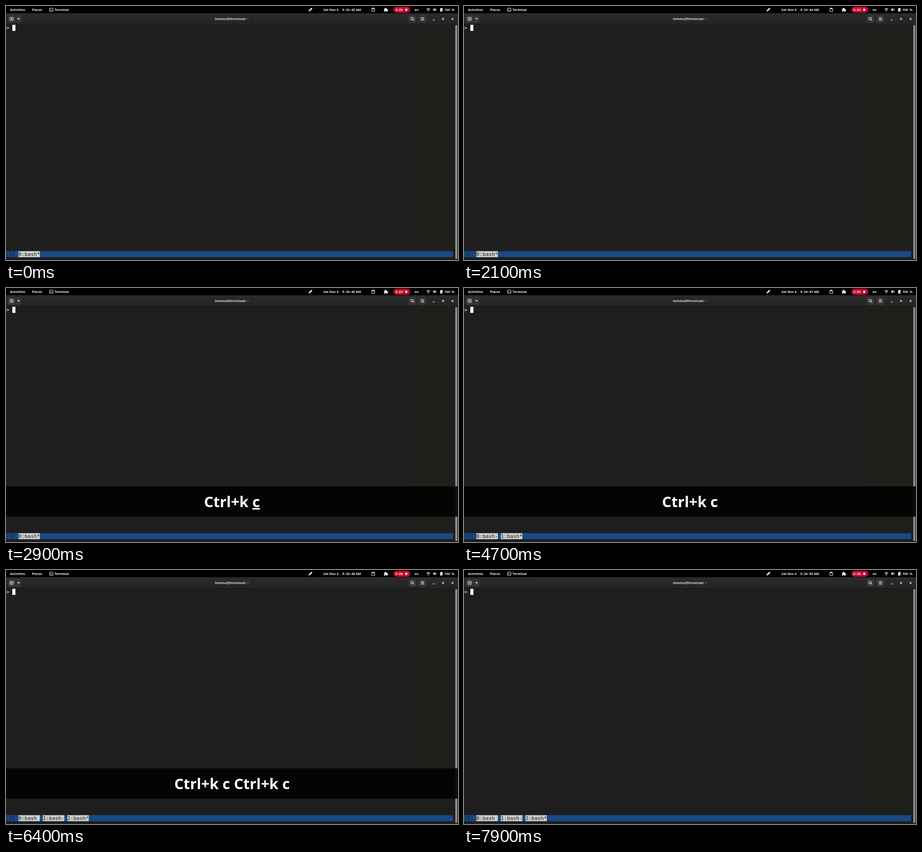
These frames come from a looping animation (998x561 px, 8 s). An HTML page:

```html
<!DOCTYPE html>
<html lang="en">
<head>
<meta charset="utf-8">
<title>Terminal windows</title>
<style>
  html, body { margin: 0; width: 100%; height: 100%; overflow: hidden; background: #1e1e1e; }
  svg { display: block; width: 998px; height: 561px; }
  text { white-space: pre; }
  .ui { font: 700 7.15px "Noto Sans", "Open Sans", sans-serif; fill: #f4f4f4; }
  .mono { font: 11.2px "DejaVu Sans Mono", monospace; }
  .keys { font: 700 32.5px "Noto Sans", "Open Sans", sans-serif; fill: #fff; text-anchor: middle; }
  .held { text-decoration: underline; text-decoration-thickness: 1.8px; text-underline-offset: 2.6px; text-decoration-skip-ink: none; }
  .line { fill: none; stroke: #f0f0f0; stroke-width: 1.1; }
  .icon { fill: #f0f0f0; }
</style>
</head>
<body>
<svg viewBox="0 0 998 561">
  <defs>
    <linearGradient id="head" x2="0" y2="1">
      <stop offset="0" stop-color="#2b2b2b"/>
      <stop offset="1" stop-color="#242424"/>
    </linearGradient>
  </defs>
  <rect width="998" height="561" fill="#1e1e1e"/>
  <rect x="887" y="40" width="111" height="521" fill="#1e1e1a"/>

  <!-- top bar -->
  <rect width="998" height="16" fill="#000"/>
  <g class="ui">
    <text x="9" y="10.6">Activities</text>
    <text x="57.5" y="10.6">Places</text>
    <text x="107" y="10.6">Terminal</text>
    <text x="700.8" y="10.6">Sat Nov 4</text>
    <text id="clock" x="742.6" y="10.6"></text>
    <text x="772.4" y="10.6">AM</text>
    <text x="902" y="10.6">en</text>
    <text x="968" y="10.6" word-spacing="1.6">100 %</text>
  </g>
  <rect class="line" x="96.2" y="4.7" width="7.4" height="6.8" rx="1"/>
  <path class="line" style="stroke-width:.9" d="M97.8 6.6l1.5 1.4-1.5 1.4M100.2 9.8h2"/>
  <!-- eyedropper -->
  <path class="icon" d="M668 12l.7-2.5 3.4-3.4 1.9 1.9-3.4 3.4zM671.6 5.6l.8-.8 1 .8 1-1.2q1.2-.7 1.6.2 .5.8-.3 1.6l-1.1 1 .6 1-.8.8z"/>
  <!-- clipboard -->
  <rect class="line" x="807.9" y="5.2" width="6" height="6.8" rx=".8"/>
  <rect class="icon" x="809" y="4" width="3.8" height="2.7" rx=".6"/>
  <!-- puzzle piece -->
  <path class="icon" d="M834.6 6h2.3a1.5 1.5 0 1 1 2.8 0h2.2v2.2a1.4 1.4 0 1 1 0 2.7v1.6h-2.2a1.4 1.4 0 0 0-2.8 0h-2.3v-2.2a1.4 1.4 0 0 0 0-2.5z"/>
  <!-- recording pill -->
  <rect x="855.3" y="1.4" width="37.4" height="13.6" rx="6.8" fill="#bf0a2b"/>
  <text id="count" class="ui" x="860" y="10.6"></text>
  <rect x="881.6" y="6" width="4.4" height="4.5" fill="#fff"/>
  <!-- wifi, sound, battery -->
  <path class="line" d="M928.5 7.2q4-3.7 8 0M930 9q2.5-2.3 5 0"/>
  <circle class="icon" cx="932.5" cy="10.8" r="1.1"/>
  <path class="icon" d="M943 6.8h1.5l2.3-2.2v7.2l-2.3-2.2H943z"/>
  <path class="line" style="stroke-width:.9" d="M947.8 6.6q1.2 1.6 0 3.2M949 5.2q2.3 3 0 6"/>
  <path class="icon" d="M958.6 5.2h1.5v-1h2.6v1h1.5v3h-1.8v4h-3.8z"/>
  <path class="line" style="stroke-width:.9" d="M963.6 8.8l-1 1.7h2l-1 1.7"/>

  <!-- title bar -->
  <rect y="16" width="998" height="24" fill="url(#head)"/>
  <rect y="40" width="998" height="1" fill="#181818"/>
  <g fill="#363636">
    <rect x="4" y="20" width="30" height="17" rx="3"/>
    <rect x="889" y="20" width="17" height="17" rx="3"/>
    <rect x="911" y="20" width="17" height="17" rx="3"/>
  </g>
  <rect x="21" y="20" width="1" height="17" fill="#272727"/>
  <rect class="line" x="8.7" y="25" width="7.4" height="7" rx="1.2"/>
  <path class="line" d="M10.2 28.5h4.4M12.4 26.3v4.4"/>
  <path class="icon" d="M24.9 27h6l-3 3.2z"/>
  <text class="ui" x="498.6" y="31" text-anchor="middle" style="fill:#dedede">temmo@fernstead: ~</text>
  <circle class="line" cx="896.7" cy="27.7" r="2.7"/>
  <path class="line" d="M898.7 29.7l2.6 2.6M916 25.9h7.2M916 28.5h7.2M916 31.1h7.2"/>
  <path class="line" d="M942.2 30.6h4.2M984 26.6l3.9 3.9M987.9 26.6l-3.9 3.9"/>
  <rect class="line" x="963.6" y="27.1" width="2.8" height="2.8"/>

  <!-- terminal -->
  <text id="prompt" class="mono" x=".5" y="52.1" fill="#fff">&gt;</text>
  <rect id="cursor" y="41.5" width="6.75" height="13.5" fill="#fff"/>
  <rect y="541.5" width="987" height="13.3" fill="#194a87"/>
  <text class="mono" x=".5" y="552.1" fill="#171a20">[0]</text>
  <g id="tabs"></g>
  <rect x="992" y="42" width="4.5" height="517" rx="2.2" fill="#8f8f8c"/>

  <!-- pressed keys -->
  <g id="overlay">
    <rect y="438" width="998" height="67" fill="#020300" fill-opacity=".9"/>
    <text id="keys" class="keys" x="499" y="484"></text>
  </g>
</svg>
<script>
  const LOOP = 8000, CELL = 6.75, LEFT = 0.5;
  const $ = id => document.getElementById(id);

  // Each table lists [start ms, value]; underscores wrap the held keys.
  const KEYS = [
    [0, ""], [2200, "_Ctrl+k_"], [2500, "Ctrl+k"], [2900, "Ctrl+k _c_"], [3100, "Ctrl+k c"],
    [4800, "Ctrl+k c _Ctrl+k_"], [5000, "Ctrl+k c Ctrl+k"],
    [5200, "Ctrl+k c Ctrl+k _c_"], [5500, "Ctrl+k c Ctrl+k c"], [7900, ""]
  ];
  const WINDOWS = [[0, 1], [3000, 2], [5300, 3]];
  const PROMPT = [[0, true], [3000, false], [3400, true], [5300, false], [5700, true]];
  const CURSOR = [
    [0, true], [600, false], [900, true], [1500, false], [2100, true], [2800, false], [2900, true],
    [3500, false], [4100, true], [5800, false], [6400, true], [7000, false], [7600, true]
  ];

  const at = (table, t) => table.filter(step => step[0] <= t).pop()[1];
  const show = (el, on) => el.setAttribute("visibility", on ? "visible" : "hidden");

  const cache = new Map();
  function fill(id, html) {
    if (cache.get(id) === html) return;
    cache.set(id, html);
    $(id).innerHTML = html;
  }

  // Time separators sit in a wider space than a plain colon.
  const spaced = s => s.replace(/:(.)/g, '<tspan dx=".85">:</tspan><tspan dx=".85">$1</tspan>');

  function tabs(n) {
    let html = "";
    for (let i = 0; i < n; i++) {
      const x = LEFT + CELL * (4 + 8 * i);
      const flag = i === n - 1 ? "*" : i === n - 2 ? "-" : " ";
      html += `<rect x="${x}" y="541.5" width="${CELL * 7}" height="13.3" fill="#d0cfcc"/>` +
        `<text class="mono" x="${x}" y="552.1" fill="#171a20">${i}:bash${flag}</text>`;
    }
    return html;
  }

  function draw(t) {
    const second = t < 500 ? 42 : 42 + Math.floor((t + 600) / 1000);
    fill("clock", spaced("9:34:" + second));
    fill("count", spaced("0:0" + Math.floor((t + 300) / 1000)));
    fill("tabs", tabs(at(WINDOWS, t)));

    const ready = at(PROMPT, t);
    show($("prompt"), ready);
    $("cursor").setAttribute("x", LEFT + (ready ? 2 * CELL : 0));
    show($("cursor"), at(CURSOR, t));

    const keys = at(KEYS, t);
    show($("overlay"), keys);
    fill("keys", keys.replace(/_(.+?)_/, '<tspan class="held">$1</tspan>'));
  }

  const start = performance.now();
  function frame() {
    draw((performance.now() - start) % LOOP);
    requestAnimationFrame(frame);
  }
  frame();
</script>
</body>
</html>
```
